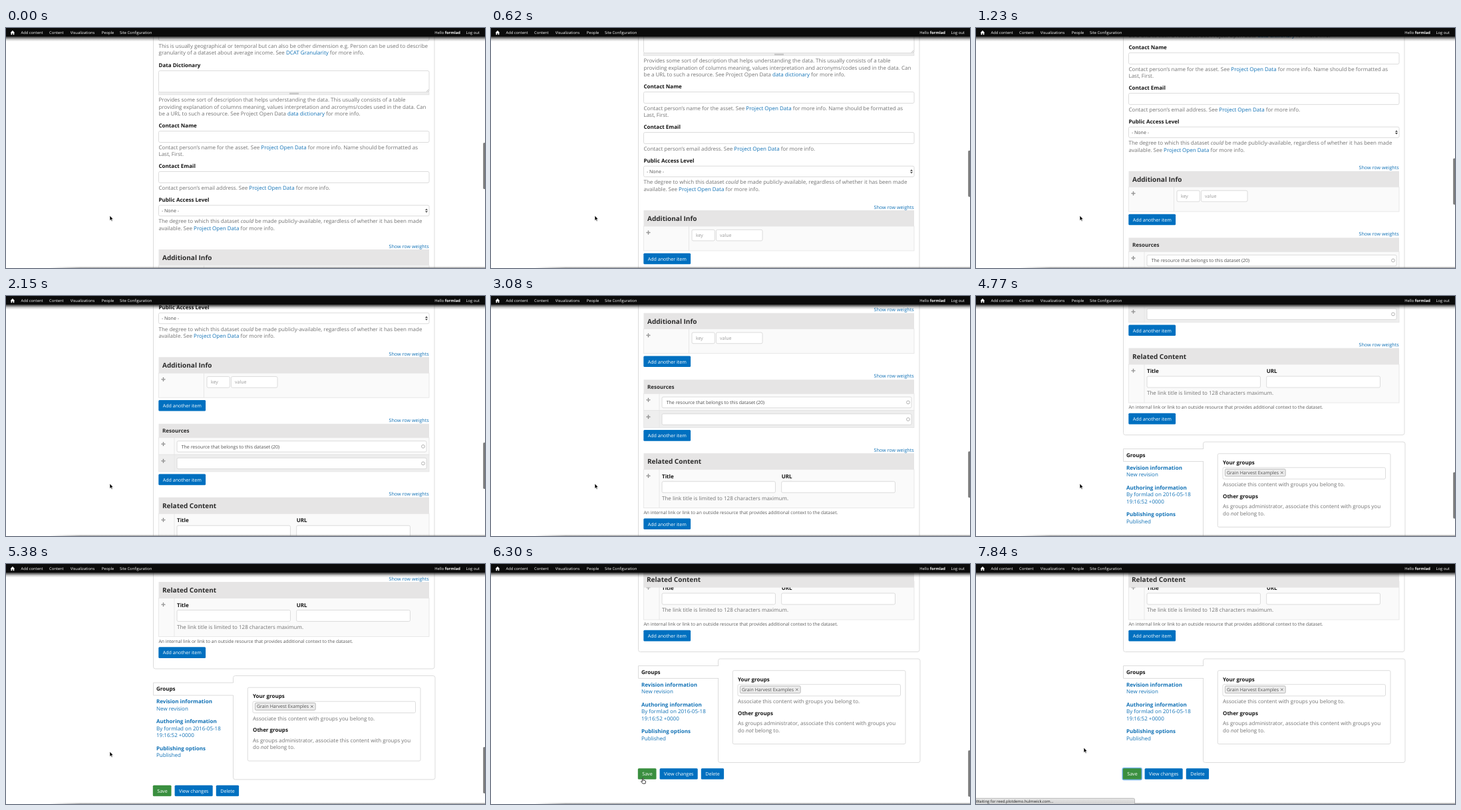
An HTML page for the animation above (8 s loop, 720x362 px).

```html
<!DOCTYPE html>
<html lang="en">
<head>
<meta charset="utf-8">
<title>Dataset form</title>
<style>
  html, body { margin: 0; width: 100%; height: 100%; overflow: hidden; background: #fff; }
  svg { display: block; width: 100%; height: 100%; }
  text { font: 8.03px "Open Sans", sans-serif; fill: #737373; text-rendering: geometricPrecision; white-space: pre; }
  .link { fill: #1272b6; }
  .bold { font-weight: 700; }
  .label { font-weight: 700; fill: #151515; }
  .head { font-weight: 700; fill: #2b2b2b; }
  .big { font-size: 10.03px; }
  .mid { font-size: 7.2px; }
  .note { font-size: 6.8px; fill: #5a5a5a; }
  .value { font-size: 7.02px; fill: #505050; }
  .hint { font-size: 7px; fill: #999; }
  .btn { font-size: 7.08px; fill: #fff; }
  .bar { font-size: 5.8px; fill: #fff; }
  .field { fill: #fff; stroke: #d3d3d3; stroke-width: .8; }
  .panel { fill: #fff; stroke: #d9d9d9; stroke-width: .9; }
  .cell { fill: #fafafa; stroke: #e4e4e4; stroke-width: .8; }
  .shade { fill: #eee; }
  .rule { stroke: #e4e4e4; stroke-width: .8; }
  .header { fill: #e6e5e5; }
  .blue { fill: #0070c0; }
  .green { fill: #3a8f3f; }
</style>
</head>
<body>
<svg viewBox="0 0 720 362" preserveAspectRatio="none">
  <defs>
    <linearGradient id="topShade" x2="0" y2="1">
      <stop offset="0" stop-color="#000" stop-opacity=".8"/>
      <stop offset=".3" stop-color="#000" stop-opacity=".42"/>
      <stop offset=".6" stop-color="#000" stop-opacity=".16"/>
      <stop offset="1" stop-color="#000" stop-opacity="0"/>
    </linearGradient>
    <linearGradient id="lowShade" x2="0" y2="1">
      <stop offset="0" stop-color="#555" stop-opacity="0"/>
      <stop offset=".5" stop-color="#555" stop-opacity=".15"/>
      <stop offset="1" stop-color="#555" stop-opacity=".75"/>
    </linearGradient>
    <linearGradient id="fadeIn">
      <stop offset="0" stop-color="#000"/>
      <stop offset=".07" stop-color="#fff"/>
    </linearGradient>
    <mask id="lowMask"><rect x="66" y="350" width="654" height="12" fill="url(#fadeIn)"/></mask>
    <linearGradient id="statusFill" x2="0" y2="1">
      <stop offset="0" stop-color="#e6e6e6"/>
      <stop offset="1" stop-color="#cfcfcf"/>
    </linearGradient>
    <g id="drag">
      <path d="M-2 0H2M0-2V2" stroke="#777" stroke-width=".8"/>
      <path d="M-3.2 0l1.4-1.2v2.4zM3.2 0l-1.4-1.2v2.4zM0-3.2l-1.2 1.4h2.4zM0 3.2l-1.2-1.4h2.4z" fill="#777"/>
    </g>
  </defs>

  <g id="page"></g>
  <g id="sticky"></g>

  <rect id="thumb" x="717.2" width="3.4" height="70" rx="1.7" fill="#7d7d7d"/>
  <rect x="66" y="359" width="654" height="3" fill="url(#lowShade)" mask="url(#lowMask)"/>

  <rect y="13.4" width="720" height="7" fill="url(#topShade)"/>
  <rect width="720" height="13.4" fill="#0b0b0b"/>
  <path d="M6.6 7.2L9.9 3.8l3.3 3.4h-.9v3.1h-1.7V8H9.2v2.3H7.5V7.2z" fill="#fff"/>
  <g id="bar"></g>

  <g id="status">
    <path d="M-1 363V353.4H236.5Q238.5 353.4 238.5 355.4V363z" fill="url(#statusFill)" stroke="#a5a5a5" stroke-width=".7"/>
    <text x="0" y="359.7" class="bar" style="fill:#222">Waiting for reed.plotdemo.hulmwick.com...</text>
  </g>

  <path id="arrow" d="M0 0V7.4L1.7 5.9L2.9 8.6L4.1 8.1L2.9 5.4H5.2z" fill="#000" stroke="#fff" stroke-width=".6"/>
  <path id="hand" d="M-1-4Q0-4.6.4-3.6V-.8L3-.2Q4-0 3.9 1L3.4 4.2H-.6L-3 1.2Q-3 .2-2.2.3L-1 1.2z" fill="#fff" stroke="#111" stroke-width=".8"/>
</svg>

<script>
const $ = id => document.getElementById(id);
const LEFT = 229.5, RIGHT = 636;

const rect = (cls, x1, y1, x2, y2, r = 0) =>
  `<rect class="${cls}" x="${x1}" y="${y1}" width="${x2 - x1}" height="${y2 - y1}" rx="${r}"/>`;

// y is the visual middle; [x] marks a link and _x_ emphasis
const text = (cls, x, y, str, drop = 2.8) => {
  const body = str.replace(/\[(.+?)\]/g, '<tspan class="link">$1</tspan>')
                  .replace(/_(.+?)_/g, '<tspan font-style="italic">$1</tspan>');
  return `<text class="${cls}" x="${x}" y="${y + drop}">${body}</text>`;
};
const lines = (x, y, ...rows) => rows.map((s, i) => text('', x, y + i * 10.4, s)).join('');
const label = (x, y, s) => text('label', x, y, s);
const field = (x1, y1, x2, y2) => rect('field', x1, y1, x2, y2, 2);
const button = (cls, x1, y, x2, s) =>
  rect(cls, x1 - .2, y - .2, x2 + .1, y + 16.4, 1.5) + text('btn', x1 + 6.3, y + 8.3, s, 2.6);
const drag = y => `<use href="#drag" x="236.5" y="${y}"/>`;
const weights = y => text('mid link', 575.5, y, 'Show row weights', 2.6);
const header = (y1, y2, s, big = '') =>
  rect('header', LEFT, y1, RIGHT, y2) + text('head ' + big, 235, (y1 + y2) / 2 + .4, s, big ? 3.5 : 2.8);
const row = (y1, y2, split, shade = '') =>
  rect('cell ' + shade, LEFT, y1, RIGHT, y2) +
  `<path class="rule" d="M${split} ${y1}V${y2}"/>` + drag(y1 + 9.6);
const ring = y => `<circle cx="627" cy="${y}" r="2.4" fill="none" stroke="#aaa" stroke-width=".9"/>`;
const tab = (y, title, ...rows) =>
  text('link bold', 226, y, title) +
  rows.map((s, i) => text('link', 226, y + 10.5 * (i + 1), s)).join('');

$('page').innerHTML = [
  rect('panel', 221.5, -60, 644, 676.5, 3),
  field(LEFT, 2, RIGHT, 19),
  lines(LEFT, 27.2,
    'This is usually geographical or temporal but can also be other dimension e.g. Person can be used to describe',
    'granularity of a dataset about average income. See [DCAT Granularity] for more info.'),

  label(LEFT, 56, 'Data Dictionary'),
  field(LEFT, 64.5, RIGHT, 96.8),
  '<path d="M632 96l3.4-3.4M634 96l1.4-1.4" stroke="#999" stroke-width=".6"/>',
  '<rect x="229.5" y="97" width="406.5" height="3.8" fill="#eee" stroke="#ddd" stroke-width=".6"/>',
  '<path d="M426 98.2H440M426 99.6H440" stroke="#aaa" stroke-width=".7"/>',
  lines(LEFT, 108.5,
    'Provides some sort of description that helps understanding the data. This usually consists of a table',
    'providing explanation of columns meaning, values interpretation and acronyms/codes used in the data. Can',
    'be a URL to such a resource. See Project Open Data [data dictionary] for more info.'),

  label(LEFT, 147.2, 'Contact Name'),
  field(LEFT, 155.5, RIGHT, 172.5),
  lines(LEFT, 180,
    'Contact person’s name for the asset. See [Project Open Data] for more info. Name should be formatted as',
    'Last, First.'),

  label(LEFT, 208.3, 'Contact Email'),
  field(LEFT, 216.5, RIGHT, 233.5),
  lines(LEFT, 241, 'Contact person’s email address. See [Project Open Data] for more info.'),

  label(LEFT, 259.2, 'Public Access Level'),
  field(LEFT, 267.3, RIGHT, 283.5),
  text('value', 234, 275.5, '- None -', 2.6),
  '<path d="M630 274.8l2-2.4 2 2.4zM630 276.2l2 2.4 2-2.4z" fill="#444"/>',
  lines(LEFT, 291.5,
    'The degree to which this dataset _could_ be made publicly-available, regardless of whether it has been made',
    'available. See [Project Open Data] for more info.'),

  weights(329),
  row(358, 395, 297.5),
  header(334, 358, 'Additional Info', 'big'),
  field(302, 363.3, 336.3, 380),
  field(338.5, 363.3, 408, 380),
  text('hint', 308, 371.8, 'key', 2.4),
  text('hint', 344, 371.8, 'value', 2.4),
  button('blue', LEFT, 399, 300, 'Add another item'),

  weights(429),
  row(455.5, 481, 253),
  row(481, 506.7, 253, 'shade'),
  header(434.5, 455.5, 'Resources'),
  field(257, 460.5, 632, 477),
  field(257, 486, 632, 502.5),
  text('value', 263.7, 468.8, 'The resource that belongs to this dataset (20)', 2.6),
  ring(468.7), ring(494.3),
  button('blue', LEFT, 510.6, 300, 'Add another item'),

  weights(540.5),
  row(570, 628, 253),
  header(545.5, 570, 'Related Content', 'big'),
  label(257, 580.4, 'Title'),
  label(436.7, 580.4, 'URL'),
  field(257, 588, 427.5, 605),
  field(436.7, 588, 607.5, 605),
  lines(257, 613.2, 'The link title is limited to 128 characters maximum.'),
  text('note', LEFT, 634.6, 'An internal link or link to an outside resource that provides additional context to the dataset.', 2.4),
  button('blue', LEFT, 644, 300, 'Add another item'),

  rect('panel', 341.5, 687, 645, 843.5, 3),
  '<path class="panel" d="M342.2 697.5H221.5V716.5H342.2"/>',
  '<rect x="340.8" y="698" width="2" height="18" fill="#fff"/>',
  label(226, 706.7, 'Groups'),
  tab(726, 'Revision information', 'New revision'),
  tab(756, 'Authoring information', 'By formlad on 2016-05-18', '19:16:52 +0000'),
  tab(796.5, 'Publishing options', 'Published'),

  rect('panel', 363.3, 704.7, 623, 815.5, 2),
  label(371, 718, 'Your groups'),
  field(371, 725.7, 615.5, 743),
  '<rect x="374.4" y="728" width="90.8" height="10.8" rx="1.5" fill="#ececec" stroke="#aaa" stroke-width=".8"/>',
  text('value', 377, 733.2, 'Grain Harvest Examples', 2.6),
  '<path d="M458 731.6l3.6 3.6M461.6 731.6l-3.6 3.6" stroke="#777" stroke-width="1"/>',
  lines(371, 751.2, 'Associate this content with groups you belong to.'),
  label(371, 769, 'Other groups'),
  lines(371, 784.6,
    'As groups administrator, associate this content with groups you',
    'do _not_ belong to.'),

  '<rect id="focus" x="220.4" y="851.9" width="28.6" height="17.4" rx="2" fill="none" stroke="#6fb0ea" stroke-width="1.8"/>',
  button('green', 221, 852.4, 248.4, 'Save'),
  button('blue', 253.8, 852.4, 310.6, 'View changes'),
  button('blue', 316, 852.4, 350, 'Delete')
].join('');

$('sticky').innerHTML = rect('header', 229, 12, RIGHT, 35.6) + text('head big', 234, 23.4, 'Related Content', 3.5);

$('bar').innerHTML = [
  [22.5, 'Add content'], [65, 'Content'], [96.7, 'Visualizations'], [143.7, 'People'],
  [171, 'Site Configuration'], [644.3, 'Hello <tspan class="bold">formlad</tspan>'], [691.5, 'Log out']
].map(([x, s]) => text('bar', x, 7, s, 2)).join('');

const LOOP = 8000, STEP = LOOP / 52;
const scrollKeys = [[0, 0], [1230, 118], [2150, 241.5], [3080, 308.5], [4770, 467], [5690, 544]];
const cursorKeys = [[5540, 156, 283], [6150, 228, 323], [6770, 228, 323], [7380, 162, 277]];

// linear between keys; ease softens each segment
const at = (keys, t, col = 1, ease = u => u) => {
  if (t <= keys[0][0]) return keys[0][col];
  const i = keys.findIndex(k => k[0] > t);
  if (i < 0) return keys[keys.length - 1][col];
  const a = keys[i - 1], b = keys[i];
  return a[col] + (b[col] - a[col]) * ease((t - a[0]) / (b[0] - a[0]));
};
const smooth = u => u * u * (3 - 2 * u);
const show = (id, on) => $(id).setAttribute('visibility', on ? 'visible' : 'hidden');
const move = (id, x, y) => $(id).setAttribute('transform', `translate(${x} ${y})`);

function draw(now) {
  const t = Math.floor(((now % LOOP) + 9) / STEP) * STEP;
  const scroll = at(scrollKeys, t);
  const x = at(cursorKeys, t, 1, smooth), y = at(cursorKeys, t, 2, smooth);
  const overSave = x > 221 && x < 248 && y > 308 && y < 325;

  move('page', 0, -scroll);
  show('sticky', scroll > 533.5);
  $('thumb').setAttribute('y', 173 + scroll * .1985);
  $('thumb').setAttribute('opacity', at([[6460, 1], [6920, 0]], t));
  move('arrow', x, y);
  move('hand', x + .6, y + 4);
  show('arrow', !overSave);
  show('hand', overSave);
  show('focus', t > 6600);
  show('status', t > 6750);
}

const start = performance.now();
function tick() {
  draw(performance.now() - start);
  requestAnimationFrame(tick);
}
tick();
</script>
</body>
</html>
```
